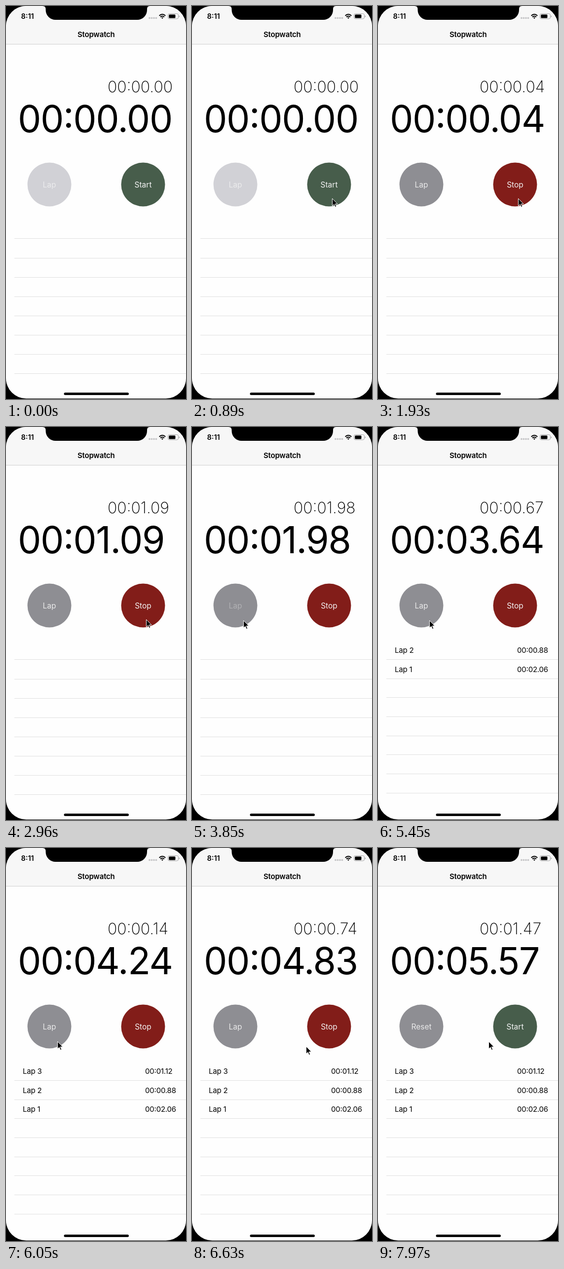
These frames come from a looping animation (365 px wide and 797 px high, 8000 ms). An HTML page:

```html
<!DOCTYPE html>
<html lang="en">
<head>
<meta charset="utf-8">
<title>Stopwatch</title>
<style>
  html, body { margin: 0; width: 100%; height: 100%; overflow: hidden; background: #000; }
  svg { display: block; width: 365px; height: 797px; }
  text { font-family: Inter, Roboto, sans-serif; font-feature-settings: "calt" 0; white-space: pre; }
  .bold { font-weight: 600; }
  .total { font-size: 75px; letter-spacing: -1.3px; }
  .split { font-size: 32px; font-weight: 200; }
  .label { font-size: 15.5px; text-anchor: middle; fill: #f4f4f4; }
  .row { font-size: 15px; letter-spacing: -.2px; }
  .lines path { stroke: #e0e0e0; }
</style>
</head>
<body>
<svg viewBox="0 0 365 797">
  <rect width="365" height="796" rx="41" fill="#fefefe"/>
  <path d="M0 77V41A41 41 0 0 1 41 0H324A41 41 0 0 1 365 41V77Z" fill="#f7f7f7"/>
  <path d="M0 77.5H365" stroke="#cfcfcf"/>
  <path d="M74 0Q80.500 0 80.500 6V8A20 20 0 0 0 100.500 28H266A20 20 0 0 0 286 8V6Q286 0 292 0Z"/>

  <text class="bold clock" x="30.500" y="26" font-size="14.500"></text>
  <g fill="#c6c6c8">
    <circle cx="291" cy="24.300" r="1.900"/><circle cx="295.500" cy="24.300" r="1.900"/>
    <circle cx="300" cy="24.300" r="1.900"/><circle cx="304.500" cy="24.300" r="1.900"/>
  </g>
  <g fill="none" stroke="#000" stroke-width="2">
    <path d="M310.700 19.700Q317 13.900 323.300 19.700M313 22.300Q317 18.700 321 22.300"/>
    <path d="M315 23.700Q317 22.300 319 23.700L317 25.900Z" fill="#000" stroke="none"/>
  </g>
  <rect x="328.500" y="15.500" width="21" height="10.500" rx="3" fill="none" stroke="#a3a3a5"/>
  <rect x="330.300" y="17.200" width="13.200" height="7.200" rx="1.500"/>
  <path d="M350.800 19V23Q352.300 22.200 352.300 21T350.800 19Z" fill="#a3a3a5"/>
  <text class="bold" x="182.800" y="63" font-size="15" letter-spacing="-.2" text-anchor="middle">Stopwatch</text>

  <text class="split" id="split" x="206" y="174.700"></text>
  <text class="total" id="total" x="24" y="255.500"></text>

  <circle id="leftDisc" cx="88" cy="362" r="44.500"/>
  <text class="label" id="leftLabel" x="88" y="368"></text>
  <circle id="rightDisc" cx="278" cy="362" r="44.500"/>
  <text class="label" id="rightLabel" x="278" y="368"></text>

  <g class="lines" id="lines"></g>
  <g id="rows"></g>
  <rect x="117.500" y="784" width="131.500" height="5" rx="2.500"/>
  <path id="cursor" d="M.5 .5V15.500L4 12.200 6.400 17.700 8.700 16.700 6.300 11.300H11Z" stroke="#fff" stroke-width="1"/>
</svg>
<script>
  const LOOP = 8000, FIRST = 450, STEP = 147.2;
  // [tick, hundredths]: the clock runs between the first and the last entry
  const clock = [[10, 4.5], [17, 109.5], [28, 273.5], [34, 364.5], [42, 483.5], [47, 557.4]];
  const marks = [206, 297, 409.5];
  const lapTimes = [206, 88, 112];
  // [tick, x, y] of the pointer's tip
  const pointer = [[0, 345, 402], [3, 284, 390], [17, 284, 390], [22, 104, 392], [39, 104, 392],
    [42, 231, 402], [44, 271, 392], [50, 271, 392], [51, 224, 392]];

  const $ = id => document.getElementById(id);
  const pad = n => String(n).padStart(2, '0');

  function sample(keys, tick) {
    const last = keys[keys.length - 1];
    if (tick <= keys[0][0]) return keys[0].slice(1);
    if (tick >= last[0]) return last.slice(1);
    const i = keys.findIndex(k => k[0] > tick);
    const a = keys[i - 1], b = keys[i];
    const f = (tick - a[0]) / (b[0] - a[0]);
    return a.slice(1).map((v, j) => v + (b[j + 1] - v) * f);
  }

  // The colon sits at the middle of the digits
  const raised = (head, tail, size) =>
    `${head}<tspan dy="${-size * .115}">:</tspan><tspan dy="${size * .115}">${tail}</tspan>`;

  function timeText(hundredths, size) {
    const n = Math.floor(hundredths);
    return raised('00', `${pad(Math.floor(n / 100))}.${pad(n % 100)}`, size);
  }

  function setButton(side, title, disc, ink, pressed) {
    const label = $(side + 'Label');
    $(side + 'Disc').setAttribute('fill', disc);
    label.textContent = title;
    label.setAttribute('fill-opacity', pressed ? .35 : ink);
  }

  function drawTable(laps) {
    const gap = laps ? 38.7 : 39.1, top = laps ? 471.4 : 471.9;
    let lines = '', rows = '';
    for (let i = 0; i < 8; i++) lines += `<path d="M17 ${Math.floor(top + gap * i) + .5}H365"/>`;
    for (let i = 0; i < laps; i++) {
      const lap = laps - i, y = 458 + 38.7 * i;
      rows += `<text class="row" x="34" y="${y}">Lap ${lap}</text>` +
        `<text class="row" x="282" y="${y}">${timeText(lapTimes[lap - 1], 15)}</text>`;
    }
    $('lines').innerHTML = lines;
    $('rows').innerHTML = rows;
  }

  function draw(tick) {
    const started = tick >= 10, stopped = tick >= 47, running = started && !stopped;
    const total = started ? sample(clock, tick)[0] : 0;
    const laps = marks.filter(m => m <= total).length;
    const lapPressed = running && laps < 3 && total + 15 >= marks[laps];

    $('total').innerHTML = timeText(total, 75);
    $('split').innerHTML = timeText(total - (laps ? marks[laps - 1] : 0), 32);
    setButton('left', stopped ? 'Reset' : 'Lap', started ? '#8e8e93' : '#d1d1d6', started ? .9 : .75, lapPressed);
    setButton('right', running ? 'Stop' : 'Start', running ? '#821d19' : '#475d4b', 1,
      (tick >= 7 && tick < 10) || tick === 46);
    drawTable(laps);

    const [x, y] = sample(pointer, tick);
    $('cursor').setAttribute('transform', `translate(${x} ${y})`);
    $('cursor').setAttribute('visibility', tick < 0 ? 'hidden' : 'visible');
  }

  document.querySelector('.clock').innerHTML = raised('8', '11', 14.5);
  let shown = null;
  function frame() {
    const t = performance.now() % LOOP;
    const tick = Math.floor((t - FIRST + 5) / STEP);
    if (tick !== shown) draw(shown = tick);
    requestAnimationFrame(frame);
  }
  frame();
</script>
</body>
</html>
```
